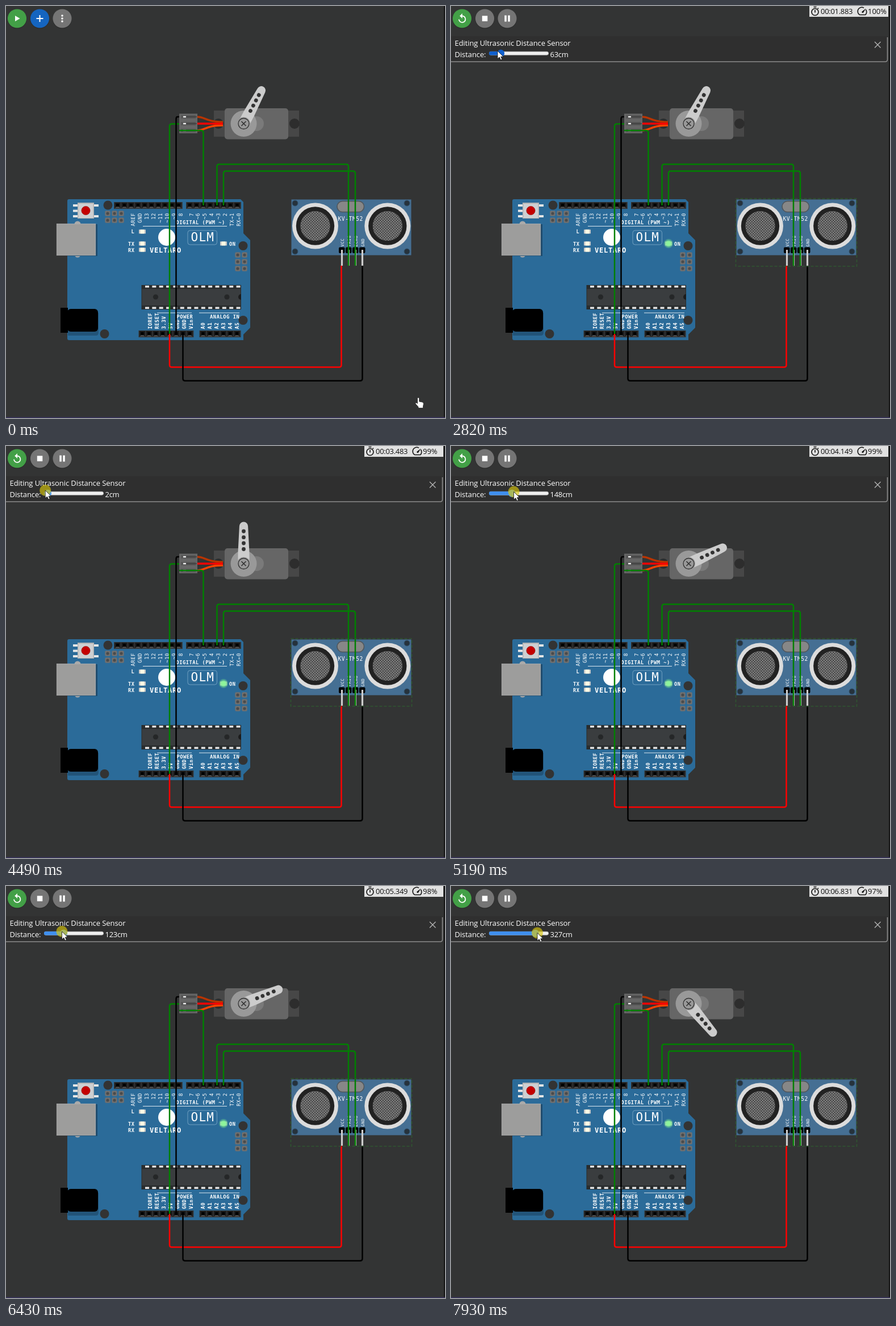
These frames come from a looping animation (773x725 px, 8 s). An HTML page:

```html
<!DOCTYPE html>
<html lang="en">
<head>
<meta charset="utf-8">
<title>Distance sensor and servo simulation</title>
<style>
  html, body { margin: 0; width: 100%; height: 100%; overflow: hidden; background: #333434; }
  svg { display: block; width: 773px; height: 725px; }
  .mono { font-family: "DejaVu Sans Mono", monospace; letter-spacing: .06em; fill: #fff; }
  .ui { font: 13px "Open Sans", "Noto Sans", sans-serif; }
  .wires path { fill: none; stroke-width: 2.5; stroke-linejoin: round; }
</style>
</head>
<body>
<svg id="stage" viewBox="0 0 773 725" xmlns="http://www.w3.org/2000/svg"></svg>
<script>
const LOOP = 8000;
const stage = document.getElementById('stage');

// ---- drawing helpers ----
const rect = (x, y, w, h, fill, extra = '') =>
  `<rect x="${x}" y="${y}" width="${w}" height="${h}" fill="${fill}" ${extra}/>`;
const circle = (x, y, r, fill, extra = '') =>
  `<circle cx="${x}" cy="${y}" r="${r}" fill="${fill}" ${extra}/>`;
const path = (d, fill, extra = '') => `<path d="${d}" fill="${fill}" ${extra}/>`;
const line = (d, color, width, extra = '') =>
  path(d, 'none', `stroke="${color}" stroke-width="${width}" ${extra}`);
const mono = (s, x, y, size, extra = '') =>
  `<text class="mono" x="${x}" y="${y}" font-size="${size}" ${extra}>${s}</text>`;
const upright = (s, x, y, size, extra = '') =>
  mono(s, 0, 0, size, `transform="translate(${x} ${y}) rotate(-90)" ${extra}`);
const repeat = (n, f) => Array.from({ length: n }, (_, i) => f(i)).join('');

function header(x, y, n) {
  return rect(x, y, n * 11.93 + 1.5, 12, '#333') + repeat(n, i => {
    const px = x + 1.5 + i * 11.93;
    return rect(px, y + 1, 10, 10, '#191919') + rect(px + 2.5, y + 3, 5, 5, '#000') +
      path(`M${px} ${y + 11}l3-3h4l3 3z`, '#484848');
  });
}

const pinBlock = (x, y, cols, rows) => repeat(cols * rows, i => {
  const px = x + (i % cols) * 12, py = y + Math.floor(i / cols) * 12;
  return rect(px - 4.7, py - 4.7, 9.4, 9.4, '#707070', 'rx="2"') + circle(px, py, 2.6, '#4b4b4b');
});

const led = (x, y) => rect(x - 6, y - 3.5, 12, 7, '#c9c9c9') + rect(x - 3.5, y - 3.5, 7, 7, '#fffbe5');

function board() {
  const top = ['AREF', 'GND', '13', '12', '~11', '~10', '~9', '8'];
  const top2 = ['7', '~6', '~5', '4', '~3', '2', 'TX→1', 'RX←0'];
  const power = ['IOREF', 'RESET', '3.3V', '5V', 'GND', 'GND', 'Vin'];
  const end = 'text-anchor="end"', bold = 'font-weight="bold"';
  return path('M111 340H413L418 345V400L430 412V566L418 578V588H111Q108 588 108 585V343Q108 340 111 340Z', '#2b6b99') +
    // connectors
    circle(126, 384, 5.5, '#aaa') + circle(126, 437, 5.5, '#aaa') +
    rect(108, 384, 53, 56, '#1d4a6c') + rect(89.3, 383.3, 68.4, 55.4, '#9d9d9c', 'stroke="#b4b4b4" stroke-width=".8"') +
    path('M109 540H163V575Q163 580 158 580H109Z', '#225479') +
    rect(108, 533, 54, 40, '#000', 'rx="6"') + rect(96, 531, 13, 44, '#000') +
    [[179.5, 350.5], [417.5, 422], [417.5, 553], [173.5, 577]].map(p => circle(...p, 8, '#333')).join('') +
    // reset button
    [351, 360.5, 370].map(y => rect(118, y - 2, 9, 4, '#e6e6e6')).join('') +
    [351, 370].map(y => rect(154, y - 2, 9, 4, '#e6e6e6')).join('') +
    rect(126, 346, 29, 28, '#b3b3b3') + rect(127.5, 348, 26, 25, '#cdd0d2') + circle(140.5, 360, 7.6, '#c30000', 'stroke="#8e0000" stroke-width=".6"') +
    pinBlock(179, 365, 3, 2) + pinBlock(408, 438, 2, 3) +
    header(190, 345, 10) + header(317, 345, 8) + header(233.5, 571, 8) + header(340.5, 571, 6) +
    // labels
    top.map((s, i) => upright(s, 227 + i * 11.93, 364, 8.9, end)).join('') +
    top2.map((s, i) => upright(s, 329.5 + i * 11.93, 364, 8.9, end)).join('') +
    power.map((s, i) => upright(s, 257.2 + i * 11.93, 568.5, 8.7, bold)).join('') +
    repeat(6, i => upright('A' + i, 350.2 + i * 11.93, 568.5, 8.9, bold)) +
    mono('DIGITAL (PWM ~)', 299.5, 384, 8.7, bold) + line('M241 387.5H389', '#dbe7ef', 1) +
    mono('POWER', 300.5, 550, 8.7, bold) + line('M266 540H327M340 540H411', '#dbe7ef', 1.2) +
    mono('ANALOG IN', 359, 550, 8.8, bold) +
    mono('L', 220.5, 400.2, 8.7, bold) + mono('TX', 215, 421.6, 8.7, bold) + mono('RX', 215, 432.6, 8.7, bold) +
    mono('ON', 393, 421.6, 8.7, bold) + led(240, 397) + led(240, 418) + led(240, 429) + led(383, 418) +
    circle(283, 407, 15, '#fff') + mono('VELTARO', 253, 433.5, 12.1, bold) +
    rect(320, 395, 51.5, 25, 'none', 'rx="4" stroke="#78a5c4" stroke-width=".9"') + mono('OLM', 325.5, 414, 21) +
    // chip
    rect(238.5, 491, 175.5, 43, '#292c2d') + rect(239.5, 498, 173.5, 29, '#3a3d3f') +
    repeat(14, i => rect(245 + i * 12.35, 492, 7, 3.5, '#e2e2e2') + rect(245 + i * 12.35, 529.5, 7, 3.5, '#e2e2e2')) +
    circle(263.5, 512, 4.6, '#252728') + circle(389, 512, 4.6, '#252728') + path('M414 507A5 5 0 0 0 414 517Z', '#1c1c1c');
}

function sensor() {
  const pins = ['VCC', 'TRIG', 'ECHO', 'GND'];
  const eye = x => circle(x, 387, 40.5, '#dcdcdc') + circle(x, 387, 33.7, '#222') +
    circle(x, 387, 26, '#8c8c8c') + circle(x, 387, 26, 'url(#mesh)');
  return rect(502.5, 340.5, 211, 98, '#456f93') +
    [509, 706].map(x => [347, 432].map(y => circle(x, y, 5, '#26323c', 'stroke="#31536f" stroke-width="1"')).join('')).join('') +
    eye(544.5) + eye(671.8) +
    rect(583, 343.5, 47.5, 19, '#878787', 'rx="9.5" stroke="#50555a" stroke-width="1.6"') +
    mono('KV-TM52', 584.5, 378, 9.6) +
    pins.map((s, i) => upright(s, 594.5 + i * 12, 423.5, 7.4)).join('') +
    repeat(4, i => rect(586 + i * 12, 424.5, 10.5, 10.5, '#000', 'rx="2"') +
      rect(589.9 + i * 12, 429, 3.2, 28, '#ccc'));
}

function servo() {
  return rect(366, 184, 150, 46, '#474747') + circle(374, 207, 9, '#2d2d2d') + circle(508, 207, 9, '#2d2d2d') +
    line('M336 195C351 195 352 204 382 204', '#b93400', 3.4) +
    line('M336 219C351 219 352 210 382 210', '#ff4200', 3.4) +
    line('M336 207H382', '#f00', 3.6) +
    rect(305, 189.5, 32, 34.5, '#666') +
    [195, 207, 219].map(y => rect(308, y - 3, 26, 6, '#565656') + line(`M317 ${y}H336`, '#303030', 1) + rect(312, y - 1.2, 5, 2.4, '#eee')).join('') +
    rect(385, 180, 112, 54.5, '#666', 'rx="5"') + circle(441, 207, 13, '#7a7a7a') + circle(418.5, 207, 23, '#999');
}

const horn = `<g id="horn">` +
  path('M-10 0V-20L-7.6-66A7.6 7.6 0 0 1 7.6-66L10-20V0A10 10 0 0 1-10 0Z', '#ccc') +
  [57, 46.3, 36, 25.5].map(r => circle(0, -r, 3.4, '#333')).join('') + '</g>' +
  circle(418.5, 207, 11.5, '#999') + circle(418.5, 207, 9.5, '#999', 'stroke="#333" stroke-width="1.3"') +
  line('M414.5 203L422.5 211M422.5 203L414.5 211', '#333', 1.7);

const wires = '<g class="wires">' + [
  ['M305 207.5H292Q288 207.5 288 211.5V577', 'green'],
  ['M305 195H302Q299.5 195 299.5 199V577', '#000'],
  ['M305 219H343Q347.5 219 347.5 223V351', 'green'],
  ['M371.5 351V282.5Q371.5 278.5 375.5 278.5H599Q603 278.5 603 282.5V457', 'green'],
  ['M383 351V294.5Q383 290.5 387 290.5H611Q615 290.5 615 294.5V457', 'green'],
  ['M288 577V631.5Q288 635.5 292 635.5H586.5Q590.5 635.5 590.5 631.5V457', 'red'],
  ['M311.5 577V655.5Q311.5 659.5 315.5 659.5H623.5Q627.5 659.5 627.5 655.5V457', '#000']
].map(([d, c]) => `<path d="${d}" stroke="${c}"/>`).join('') + '</g>';

const button = (x, fill, icon) => circle(x, 23.2, 16.8, '#222', 'opacity=".4"') + circle(x, 22, 16.6, fill) + icon;
const idleButtons = '<g id="idle">' +
  button(19.5, '#43a047', path('M16 17V27L24.6 22Z', '#fff')) +
  button(59.5, '#1565c0', line('M59.5 16V28M53.5 22H65.5', '#fff', 2)) +
  button(99, '#757575', [17, 22, 27].map(y => circle(99, y, 1.8, '#fff')).join('')) + '</g>';
const runButtons = '<g id="running">' +
  button(19.5, '#43a047', line('M14 23.5A5.7 5.7 0 1 0 19.5 17.5', '#fff', 1.8) + path('M20 13V22L15.2 17.5Z', '#fff')) +
  button(59.5, '#757575', rect(54.8, 17.3, 9.5, 9.5, '#fff')) +
  button(99, '#757575', rect(94.3, 16.5, 3.5, 11, '#fff') + rect(100.3, 16.5, 3.5, 11, '#fff')) + '</g>';

const clock = `<g id="clock" class="ui" fill="#111">` + rect(631, 0, 139, 19, '#e1e1e1') +
  circle(641, 10.5, 6, 'none', 'stroke="#111" stroke-width="1.6"') + line('M641 7V11.5M638.5 1.8H643.5M645.5 5L647 3.6', '#111', 1.6) +
  line('M719.5 15.5A7 7 0 0 1 727 3.4M730.3 6.2A7 7 0 0 1 729.7 15.5H719.5', '#111', 1.6) + path('M723.2 10.2L730.5 4.2L726 11.8A1.8 1.8 0 0 1 723.2 10.2Z', '#111') +
  `<text id="elapsed" x="651" y="14" letter-spacing="-.3"></text><text id="speed" x="734" y="14"></text></g>`;

const panel = `<g id="panel" class="ui" fill="#fff">` +
  path('M0 53H765Q769 53 769 57V94Q769 98 765 98H0Z', '#2f2f2f') +
  line('M768.5 55V94Q768.5 98 764.5 98H0', '#8c8c8c', 1.6) +
  `<text x="6.5" y="69.5" letter-spacing="-.08">Editing Ultrasonic Distance Sensor</text>` +
  `<text x="6.5" y="89.5" letter-spacing="-.08">Distance:</text><text id="value" x="174.5" y="89.5" letter-spacing="-.3"></text>` +
  rect(67.3, 80.3, 104.4, 6, '#efefef', 'rx="3" stroke="#b2b2b2" stroke-width=".7"') +
  `<rect id="fill" x="67" y="80" height="6.6" rx="3.2"/><circle id="thumb" cy="83.3" r="6.5"/>` +
  line('M746 63L756.5 73.5M756.5 63L746 73.5', '#b5b5b5', 1.4) + '</g>';

const cursor = `<g id="cursor">` +
  circle(0, 0, 10, '#d8c60c', 'id="press" opacity=".65"') +
  path('M-1.5 1.5Q-1.5 0 0 0Q1.7 0 1.7 1.7V7L7 8Q9.5 8.6 9.4 11L8.4 16V18.5H0V16.5L-5 11Q-5.6 9.4-4 9Q-3 9-1.5 10.6Z', '#fff', 'id="hand" stroke="#222" stroke-width=".8"') +
  path('M0 0V14L3.3 11L5.6 16L8 15L5.8 10.2L10 10Z', '#fff', 'id="arrow" stroke="#111" stroke-width=".8"') + '</g>';

stage.innerHTML =
  `<defs><pattern id="mesh" width="4.7" height="4.7" patternUnits="userSpaceOnUse">` +
  path('M0 0H2.35V4.7H4.7V2.35H0Z', '#3c3c3c') + `</pattern>` +
  `<radialGradient id="glow"><stop offset=".4" stop-color="#8df59b"/><stop offset="1" stop-color="#5fd08a" stop-opacity=".15"/></radialGradient></defs>` +
  rect(0, 0, 773, 725, '#333434') + rect(771, 0, 2, 725, '#151515') + rect(0, 723.5, 773, 1.5, '#36305c') +
  board() + circle(383, 418, 8.5, 'url(#glow)', 'id="power"') + sensor() + servo() + wires + horn +
  rect(501.5, 339, 213, 119, 'none', 'id="select" stroke-width="1.6" stroke-dasharray="5 3"') +
  idleButtons + runButtons + panel + clock + cursor;

// ---- motion ----
const $ = Object.fromEntries([...stage.querySelectorAll('[id]')].map(e => [e.id, e]));
const show = (el, on) => el.setAttribute('visibility', on ? 'visible' : 'hidden');
const set = (el, attrs) => Object.entries(attrs).forEach(([k, v]) => el.setAttribute(k, v));

const linear = u => u;
const smooth = u => u * u * (3 - 2 * u);

// keys: [time, value]
function track(keys, t, ease = linear) {
  if (t <= keys[0][0]) return keys[0][1];
  for (let i = 1; i < keys.length; i++) {
    const [t0, a] = keys[i - 1], [t1, b] = keys[i];
    if (t < t1) return a + (b - a) * ease((t - t0) / (t1 - t0));
  }
  return keys[keys.length - 1][1];
}

const START = 870, HOVER = 1440, OPEN = 1780, GRAB = 2940;
const moveX = [[0, 726], [70, 726], [760, 20], [900, 20], [1500, 556], [1800, 556], [2470, 82], [GRAB, 82]];
const moveY = [[0, 689], [70, 689], [760, 22], [900, 22], [1500, 357], [1800, 357], [2470, 79]];
const dragX = [[GRAB, 82], [3500, 120], [4080, 70], [4580, 69], [4980, 96], [5186, 110.5], [5700, 142],
  [6416, 98.5], [6620, 87], [6950, 70], [7060, 70], [7440, 115], [7930, 152]];
const dragY = [[GRAB, 79], [4490, 78], [5186, 80.5], [6416, 80], [7930, 82.5]];
const distance = [[2960, 63], [3550, 190], [4120, 2], [4630, 2], [4980, 82], [5186, 148], [5750, 278],
  [6416, 123], [6960, 2], [7110, 2], [7440, 168], [7930, 327]];
const angle = [[3000, 28], [3600, 84], [4200, 0], [4680, 0], [5186, 65], [5800, 123], [6416, 68], [7020, 0], [7170, 0], [7930, 140]];
const elapsed = [[START, 0], [1575, 683], [2820, 1883], [4490, 3483], [5186, 4149], [6416, 5349], [7930, 6831]];
const speed = t => [[7000, 97], [5500, 98], [3600, 99], [2300, 100], [1800, 101], [0, 103]].find(k => t >= k[0])[1];

const runs = [0, 900, 1710, 2540, 3380, 4210, 5050, 5870, 6690, 7510, 8350];
function hold(t) {
  const i = runs.findIndex(r => t < r) - 1;
  const step = (runs[i + 1] - runs[i]) / (i ? 12 : 14);
  return runs[i] + Math.floor((t - runs[i]) / step + 0.15) * step;
}

function draw(now) {
  const t = hold(now % LOOP);
  const on = t >= START, open = t >= OPEN, drag = t >= GRAB;
  const x = drag ? track(dragX, t) : track(moveX, t, smooth);
  const y = drag ? track(dragY, t) : track(moveY, t, smooth);

  show($.idle, !on);
  show($.running, on);
  show($.clock, on);
  show($.power, on);
  show($.panel, open);
  show($.select, t >= HOVER);
  set($.select, { stroke: t < 2000 ? '#47724a' : '#2f5530' });

  const ms = Math.floor(track(elapsed, t) + 0.01);
  $.elapsed.textContent = '00:' + (ms / 1000).toFixed(3).padStart(6, '0');
  $.speed.textContent = speed(t) + '%';

  const cm = Math.round(track(distance, t));
  const thumb = 73.5 + (cm - 2) / 398 * 92;
  $.value.textContent = cm + 'cm';
  set($.fill, { width: thumb - 67, fill: drag ? '#3f8fee' : '#0f60cf' });
  set($.thumb, { cx: thumb, fill: drag ? '#4d9bef' : '#0f60cf' });
  set($.horn, { transform: `translate(418.5 207) rotate(${track(angle, t)})` });

  const arrow = open && y < 98;
  set($.cursor, { transform: `translate(${x} ${y})` });
  show($.arrow, arrow);
  show($.hand, !arrow);
  show($.press, drag || (t > 790 && t < 900) || (t > 1700 && t < 1800));
}

function loop(now) {
  draw(now);
  requestAnimationFrame(loop);
}
draw(0);
requestAnimationFrame(loop);
</script>
</body>
</html>
```
